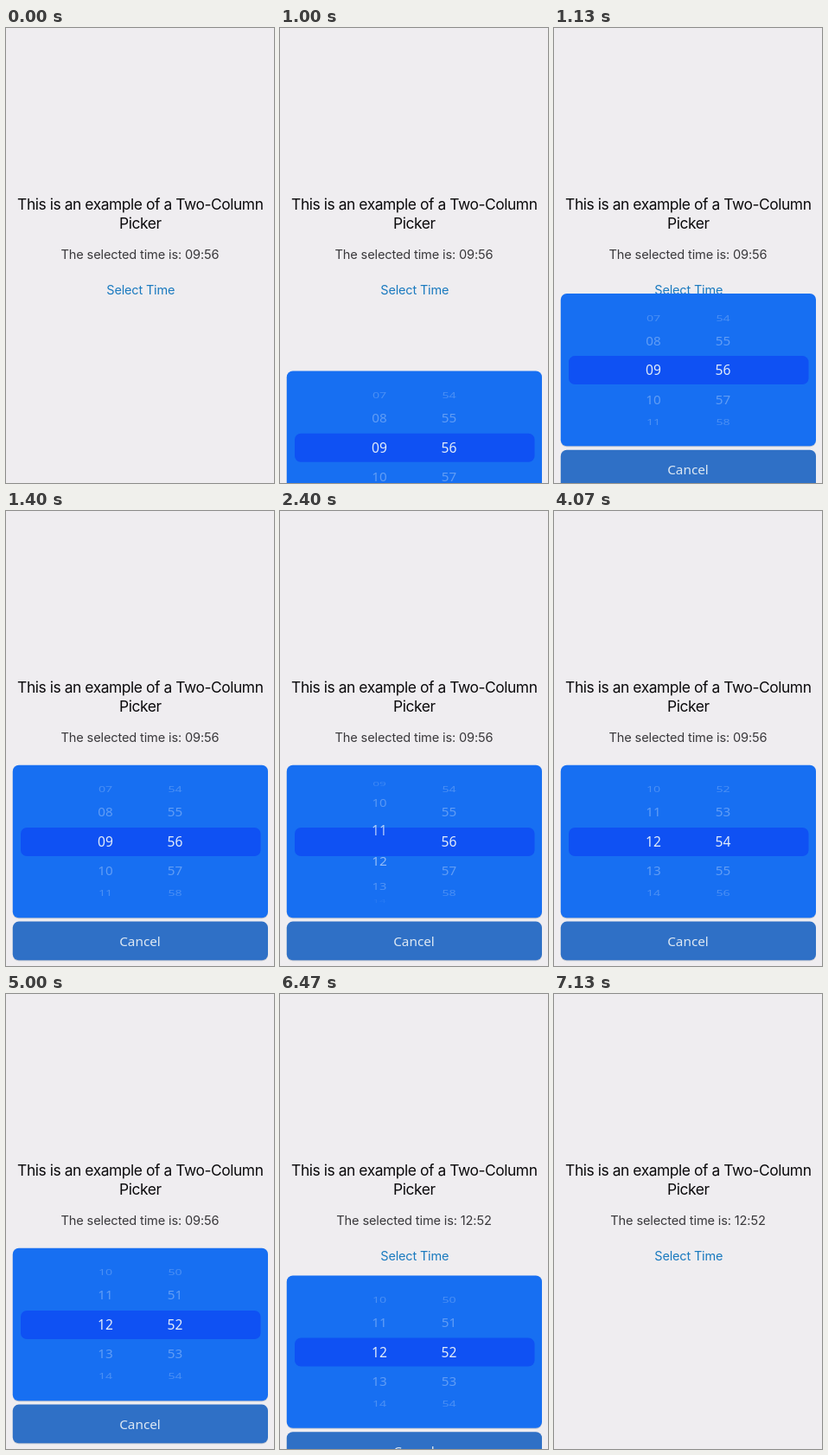
These frames come from a looping animation (310x526 px, 7340 ms). An HTML page:

```html
<!DOCTYPE html>
<html lang="en">
<head>
<meta charset="utf-8">
<title>Two-column picker</title>
<style>
  html, body { margin: 0; width: 100%; height: 100%; overflow: hidden; background: #efedf0; }
  svg { display: block; width: 100%; height: 100%; }
  text { text-anchor: middle; }
  .page { font-family: Inter, sans-serif; }
  .title { font-size: 17.4px; letter-spacing: -.025em; fill: #0b0a0c; }
  .label { font-size: 14.6px; letter-spacing: -.01em; fill: #39383b; }
  .link { font-size: 14.5px; fill: #1a7abf; letter-spacing: -.012em; }
  .sheet { font-family: "Noto Sans", "Open Sans", sans-serif; fill: #edf4fa; }
  .card { filter: drop-shadow(0 1px .6px rgba(40, 70, 110, .25)); }
  .row { font-size: 15.6px; }
  .cancel { font-size: 15.3px; fill: #dde8f3; }
</style>
</head>
<body>
<svg viewBox="0 0 310 526">
  <rect width="310" height="526" fill="#efedf0"/>
  <g class="page">
    <text class="title" x="155.3" y="209.8">This is an example of a Two-Column</text>
    <text class="title" x="155.3" y="231.6">Picker</text>
    <text class="label" id="label" x="155" y="266.6"></text>
    <text class="link" x="155.8" y="307.5">Select Time</text>
  </g>
  <g class="sheet" id="sheet">
    <rect class="card" x="7.8" y="293.8" width="295.2" height="176.4" rx="7" fill="#176ff2"/>
    <rect x="17" y="366" width="277.5" height="33" rx="7" fill="#0f51f3"/>
    <g id="wheels"></g>
    <rect class="card" x="7.8" y="474.6" width="295.2" height="44.6" rx="7" fill="#2f70c6"/>
    <text class="cancel" x="155" y="502.8">Cancel</text>
  </g>
</svg>
<script>
const LOOP = 7340, TICK = 200 / 3;
const TRAVEL = 240, OPEN = 907, CLOSE = 6434;
const STEP = 28 * Math.PI / 180, RADIUS = 72.4, MIDDLE = 382;
const $ = id => document.getElementById(id);
const clamp = v => Math.min(1, Math.max(0, v));
const span = (t, start, length) => clamp((t - start) / length);
const easeInOut = p => p * p * (3 - 2 * p);
const pad = n => String(n).padStart(2, "0");

// Cubic bezier timing, solved for x by bisection
function bezier(x1, y1, x2, y2) {
  const at = (a, b, s) => 3 * (1 - s) ** 2 * s * a + 3 * (1 - s) * s * s * b + s ** 3;
  return x => {
    let lo = 0, hi = 1;
    for (let i = 0; i < 24; i++) {
      const mid = (lo + hi) / 2;
      if (at(x1, x2, mid) < x) lo = mid; else hi = mid;
    }
    return at(y1, y2, hi);
  };
}
const slide = bezier(.36, .66, .04, 1);

function makeWheel(x, count) {
  const rows = Array.from({ length: 7 }, () => {
    const row = document.createElementNS("http://www.w3.org/2000/svg", "text");
    row.setAttribute("class", "row");
    row.setAttribute("y", 6.2);
    $("wheels").append(row);
    return row;
  });
  return pos => rows.forEach((row, i) => {
    const value = Math.round(pos) + i - 3;
    const offset = value - pos, far = Math.abs(offset);
    const angle = offset * STEP, depth = Math.max(0, Math.cos(angle));
    const y = MIDDLE + RADIUS * Math.sin(angle);
    const fade = far < 1 ? .95 - .61 * far : .34 - .1 * (far - 1);
    row.textContent = pad((value + count) % count);
    row.setAttribute("transform", `translate(${x} ${y}) scale(${.8 + .2 * depth} ${depth})`);
    row.setAttribute("opacity", fade * clamp((2.8 - far) * 2));
  });
}
const drawHours = makeWheel(115, 24);
const drawMinutes = makeWheel(195.5, 60);

function draw(time) {
  const t = Math.floor((time + 4) / TICK) * TICK;
  const hours = 9 + 3 * easeInOut(span(t, 1800, 850));
  const minutes = 56 - 2 * easeInOut(span(t, 3330, 570)) - 2 * easeInOut(span(t, 4070, 630));
  const closing = span(t, CLOSE, 90) ** 2;
  const y = TRAVEL * (1 - slide(span(t, OPEN, 440)) + closing);

  $("label").textContent = `The selected time is: ${t < CLOSE ? "09:56" : "12:52"}`;
  $("sheet").setAttribute("transform", `translate(0 ${y})`);
  $("sheet").setAttribute("visibility", t < OPEN || closing === 1 ? "hidden" : "visible");
  drawHours(hours);
  drawMinutes(minutes);
}

const start = performance.now();
function loop() {
  draw((performance.now() - start) % LOOP);
  requestAnimationFrame(loop);
}
draw(0);
requestAnimationFrame(loop);
</script>
</body>
</html>
```
